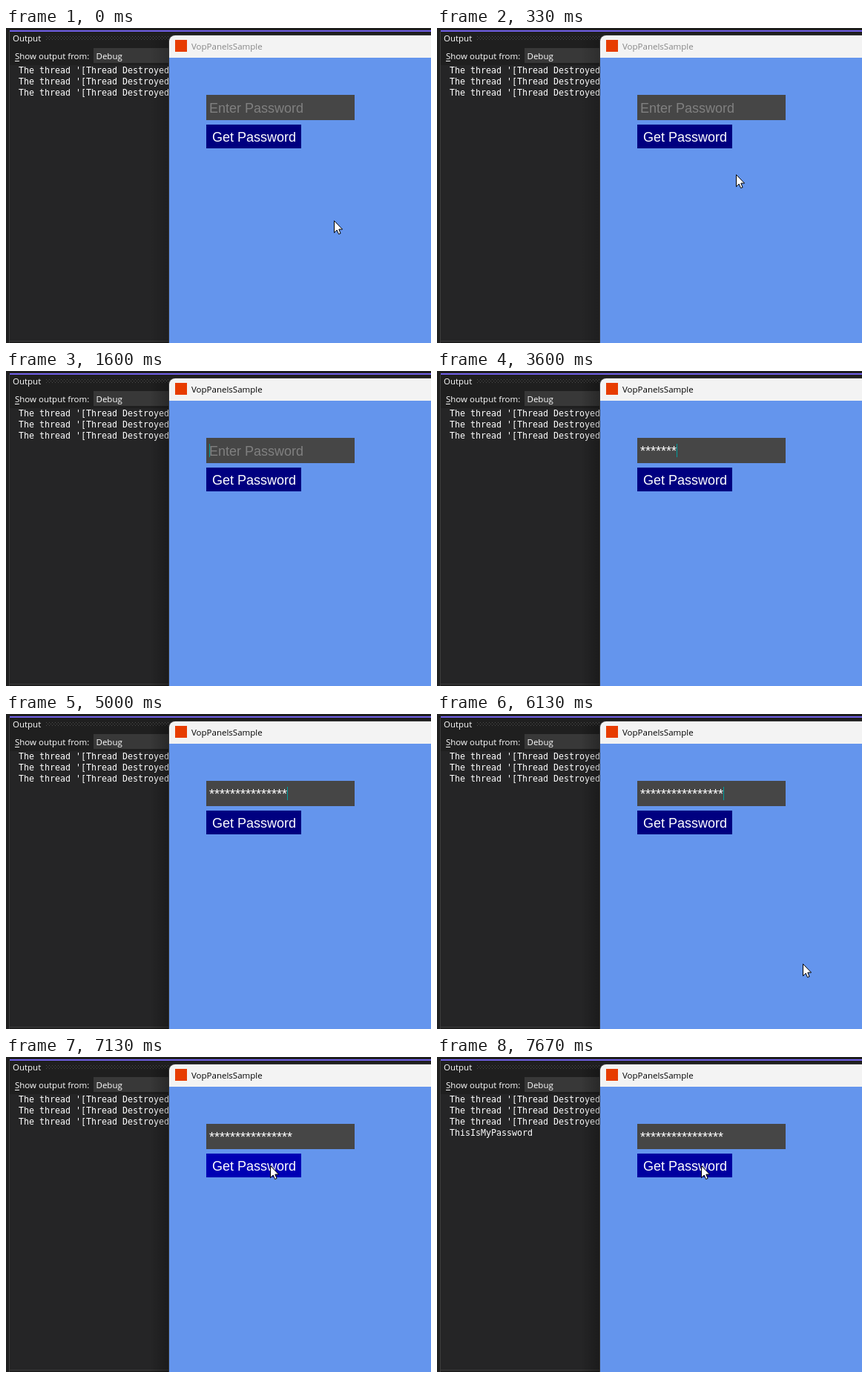
Write an HTML page that moves like this. It is 573x424 px and loops after 8000 ms.

```html
<!DOCTYPE html>
<html lang="en">
<head>
<meta charset="utf-8">
<title>Password box</title>
<style>
  html, body { margin: 0; width: 100%; height: 100%; overflow: hidden; background: #1f1f1f; }
  svg { display: block; width: 573px; height: 424px; }
  text { white-space: pre; }
  .ui { font: 11.5px "Open Sans", "Noto Sans", sans-serif; fill: #fff; }
  .log { font: 11.63px "DejaVu Sans Mono", monospace; fill: #fff; }
  .form { font: 18px "Liberation Sans", Arial, sans-serif; fill: #fff; }
</style>
</head>
<body>
<svg viewBox="0 0 573 424">
  <defs>
    <pattern id="dots" x="54" y="11" width="4" height="4" patternUnits="userSpaceOnUse">
      <path d="M0 0h1v1h-1zM2 2h1v1h-1z" fill="#4d4d4d"/>
    </pattern>
    <linearGradient id="shade">
      <stop offset="0" stop-color="#000" stop-opacity="0"/>
      <stop offset="1" stop-color="#000"/>
    </linearGradient>
  </defs>

  <!-- output panel -->
  <rect width="573" height="424" fill="#1f1f1f"/>
  <rect x="5" y="50" width="568" height="371" fill="#252526"/>
  <path d="M4.5 5V424M4 421.5H573" stroke="#3d3d3d" fill="none"/>
  <rect x="5" y="3" width="568" height="2" fill="#7160e8"/>
  <text class="ui" x="9" y="18">Output</text>
  <rect x="54" y="11" width="170" height="5" fill="url(#dots)"/>
  <text class="ui" x="12" y="42">Show output from:</text>
  <path d="M12 44.5h6" stroke="#fff"/>
  <rect x="118" y="27" width="120" height="20" fill="#383838"/>
  <text class="ui" x="121.5" y="42">Debug</text>
  <g id="log"></g>

  <!-- app window -->
  <rect id="shadow" x="194" y="14" width="26" height="410" fill="url(#shade)"/>
  <path d="M219.5 424V18a8 8 0 0 1 8-8.5H573" fill="none" stroke="#333"/>
  <path d="M220 40V18a8 8 0 0 1 8-8H573V40z" fill="#f3f3f3"/>
  <rect x="220" y="40" width="353" height="384" fill="#6495ed"/>
  <rect x="228" y="16" width="16" height="16" fill="#e73c00"/>
  <text id="title" class="ui" x="250" y="29">VopPanelsSample</text>
  <rect x="270" y="90" width="200" height="34" fill="#464646"/>
  <text id="field" class="form" x="274" y="114"></text>
  <rect id="caret" y="98" width="1" height="18" fill="#009c9c"/>
  <rect id="button" x="270" y="130" width="128" height="32"/>
  <text class="form" x="278" y="153">Get Password</text>
  <path id="mouse" d="M.5 .5V16.6L4.2 13L6.6 18.5L9.1 17.4L6.8 12H11.6Z" fill="#fff" stroke="#000"/>
</svg>
<script>
const LOOP = 8000, STEP = 1000 / 15;
const el = id => document.getElementById(id);
const set = (id, attrs) => {
  for (const key in attrs) el(id).setAttribute(key, attrs[key]);
};
const shown = on => on ? "visible" : "hidden";

// All moments below are counted in ticks of 1/15 s.
const FOCUS = 14, CARET = 15, LEAVE = 20, GONE = 24, RETURN = 90, ARRIVE = 102;
const PRESS = 107, RELEASE = 109, PRINT = 115;
const KEYS = [37, 40, 43, 44, 48, 50, 54, 57, 61, 64, 67, 69, 71, 73, 75, 80];

const ease = p => {
  p = Math.min(1, Math.max(0, p));
  return p * p * p * (p * (6 * p - 15) + 10);
};

// Eased move from a to b, bowed sideways by `bow` pixels.
function glide([ax, ay], [bx, by], p, bow = 0) {
  const e = ease(p);
  return [
    Math.round(ax + (bx - ax) * e - bow * Math.sin(Math.PI * e)),
    Math.round(ay + (by - ay) * e)
  ];
}

function mouseAt(tick) {
  if (tick < LEAVE) return glide([442, 259], [349, 109], tick / 11);
  if (tick < GONE) {
    const n = tick - LEAVE;
    return [354 + 33 * n + 9 * n * n, 106 + 12 * n + 9 * n * n];
  }
  if (tick < RETURN) return null;
  return glide([499, 343], [356, 146], (tick - RETURN) / (ARRIVE - RETURN), 5);
}

const overButton = p => p && p[0] >= 270 && p[0] < 398 && p[1] >= 130 && p[1] < 162;

function buttonFill(tick, pos) {
  if (tick >= PRESS && tick < RELEASE) return "#0000b4";
  return overButton(pos) ? "#0000a0" : "#000080";
}

const lines = Array(3).fill("The thread '[Thread Destroyed").concat("ThisIsMyPassword");
el("log").innerHTML = lines.map((line, i) =>
  `<text class="log" x="17" y="${61 + 15 * i}">${line}</text>`).join("");

function draw(time) {
  const tick = Math.floor((time % LOOP + 4) / STEP) % 120;
  const typed = KEYS.filter(k => k <= tick).length;
  const active = tick >= FOCUS;
  const pos = mouseAt(tick);

  set("title", { style: `fill:${active ? "#000" : "#868686"}` });
  set("shadow", { opacity: active ? 0.28 : 0.18 });
  el("field").textContent = typed ? "*".repeat(typed) : "Enter Password";
  set("field", { style: `fill:${typed ? "#fff" : "#808080"}` });
  set("caret", {
    x: 274 + 7 * typed,
    visibility: shown(tick >= CARET && tick < PRESS)
  });
  set("button", { fill: buttonFill(tick, pos) });
  set("mouse", {
    visibility: shown(pos),
    transform: `translate(${pos || [0, 0]})`
  });
  el("log").lastChild.setAttribute("visibility", shown(tick >= PRINT));
}

const start = performance.now();
function loop() {
  draw(performance.now() - start);
  requestAnimationFrame(loop);
}
loop();
</script>
</body>
</html>
```
